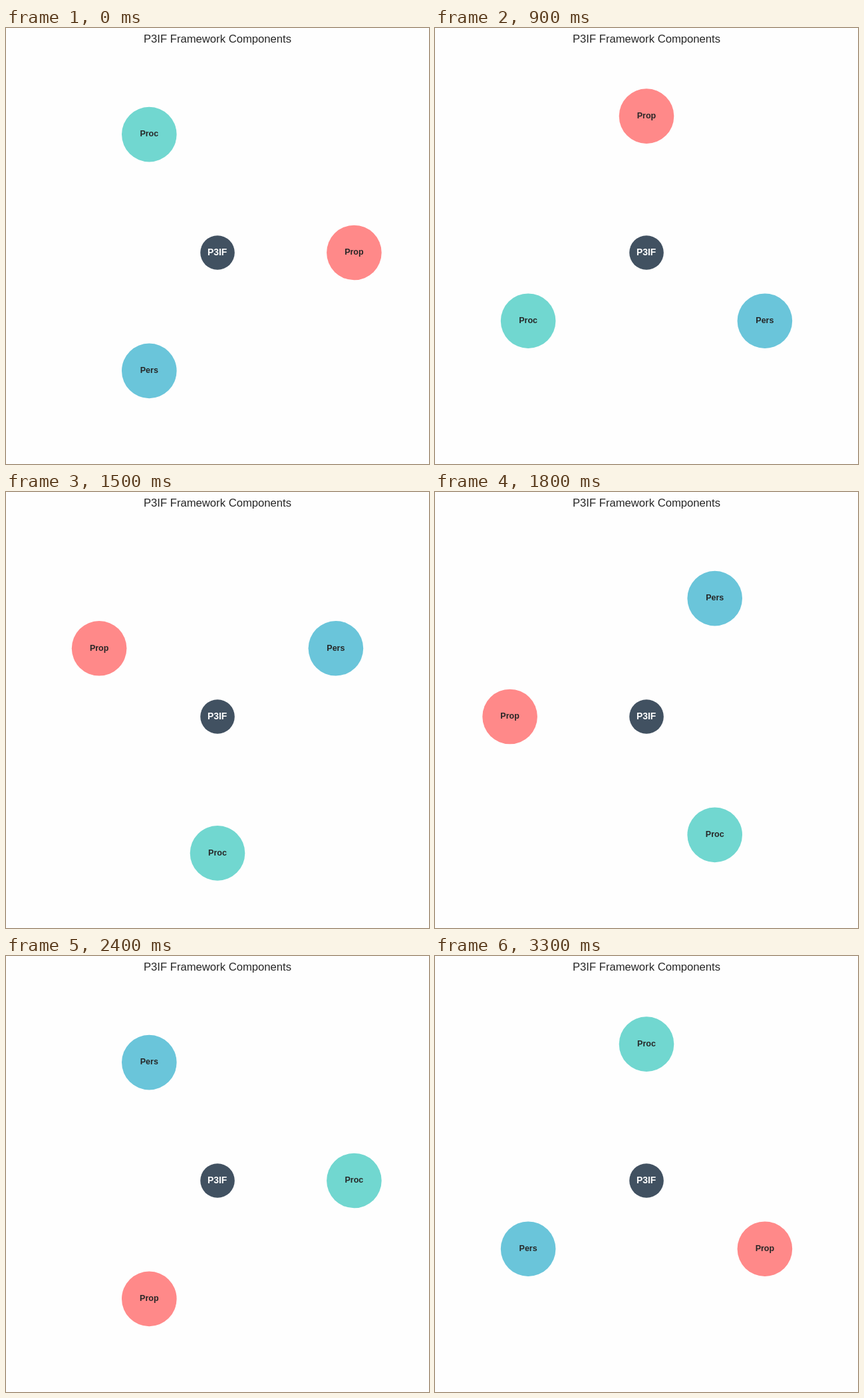
These frames come from a looping animation (636 by 656 pixels, 3.6 s). An HTML page:

```html
<!DOCTYPE html>
<html lang="en">
<head>
<meta charset="utf-8">
<title>P3IF Framework Components</title>
<style>
  html, body { margin: 0; width: 100%; height: 100%; overflow: hidden; background: #fefefe; }
  svg { display: block; }
  text { font: bold 12.5px "Liberation Sans", Arial, sans-serif; fill: #262626; text-anchor: middle; }
  .title { font-weight: normal; font-size: 16.67px; }
  .hub { font-size: 13.89px; fill: #fff; }
</style>
</head>
<body>
<svg id="stage" width="636" height="656" viewBox="0 0 636 656">
  <text class="title" x="318" y="22">P3IF Framework Components</text>
  <circle cx="318" cy="338" r="25.8" fill="#415161"/>
  <text class="hub" x="317.7" y="342">P3IF</text>
</svg>
<script>
const CENTER = { x: 318, y: 338 };
const ORBIT = 205.4;
const STEP_MS = 300;
const STEPS = 12;
const stage = document.getElementById("stage");

function add(tag, attributes) {
  const node = document.createElementNS(stage.namespaceURI, tag);
  set(node, attributes);
  return stage.appendChild(node);
}

function set(node, attributes) {
  for (const name in attributes) node.setAttribute(name, attributes[name]);
}

const satellites = [["Prop", "#ff8989"], ["Proc", "#71d7d0"], ["Pers", "#6ac5da"]].map(([name, fill], i) => {
  const circle = add("circle", { r: 41.3, fill });
  const label = add("text", {});
  label.textContent = name;
  return { circle, label, phase: i * 2 * Math.PI / 3 };
});

// The ring turns counterclockwise in hard steps of 30 degrees.
function draw() {
  const step = Math.floor(performance.now() / STEP_MS) % STEPS;
  for (const { circle, label, phase } of satellites) {
    const angle = phase + step * 2 * Math.PI / STEPS;
    const x = CENTER.x + ORBIT * Math.cos(angle);
    const y = CENTER.y - ORBIT * Math.sin(angle);
    set(circle, { cx: x, cy: y });
    set(label, { x, y: Math.round(y + 3.3) });
  }
  requestAnimationFrame(draw);
}
draw();
</script>
</body>
</html>
```
